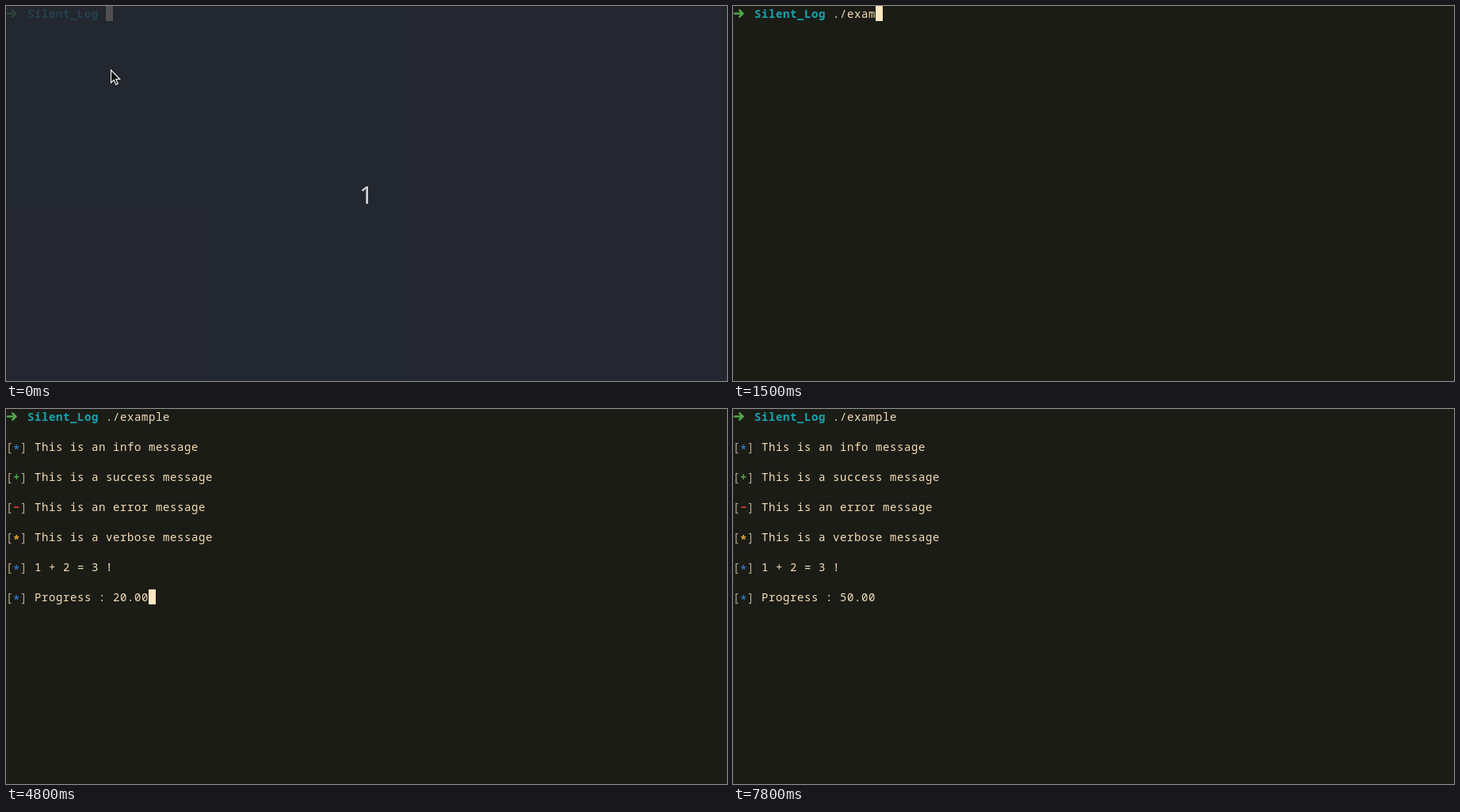
An HTML page that plays this animation: 910x474 px, repeating every 8 s.

```html
<!DOCTYPE html>
<html lang="en">
<head>
<meta charset="utf-8">
<style>
html, body { margin: 0; width: 100%; height: 100%; overflow: hidden; background: #1b1c16; }
#stage { position: relative; width: 910px; height: 474px; overflow: hidden; }
#stage > * { position: absolute; left: 0; top: 0; }
pre { margin: 0; color: #f7dfb9; font: 14px/19px "Noto Sans Mono", monospace; letter-spacing: .6px; }
pre div { position: absolute; left: 0; white-space: pre; }
i { font-style: normal; color: #b9ab90; }
.sign { font-weight: bold; }
.star { position: relative; top: 3px; }
.dir { left: 27px; color: #18a5ae; font-weight: bold; }
#typed { left: 126px; }
#block { width: 9px; height: 19px; background: #ffe7c0; }
#count { width: 910px; height: 474px; background: rgba(38, 42, 54, .8); }
#count span { position: absolute; left: 446px; top: 216px; color: #d3d5d9; font: 31px/44px "Noto Sans", sans-serif; }
</style>
</head>
<body>
<div id="stage">
  <svg width="20" height="19" fill="none" stroke="#50a648" stroke-width="2.6" stroke-linejoin="round" stroke-linecap="round">
    <path d="M2 9.5H12M8.3 5.5L12.4 9.5L8.3 13.5"/>
  </svg>
  <pre><div class="dir">Silent_Log</div><div id="typed"></div></pre>
  <pre id="output"></pre>
  <div id="block"></div>
  <div id="count"><span>1</span></div>
  <svg id="mouse" width="16" height="24">
    <path d="M.5 .8V17L4.2 13.5L6.7 19.3L9.3 18.2L6.8 12.5H11.7Z" fill="#111" stroke="#fff" stroke-width="1.1"/>
  </svg>
</div>
<script>
const $ = id => document.getElementById(id);
const LOOP = 8000, CELL = 9, ROW = 19, ENTER = 2400;
const command = "./example";

// Latest value whose start time has passed
const at = (t, steps) => steps.reduce((v, [start, next]) => t >= start ? next : v, 0);

const typing = [[400, 1], [700, 2], [1000, 3], [1200, 4], [1400, 5], [1500, 6], [1800, 7], [2100, 9]];
const progress = [[3500, 10], [4400, 20], [5400, 30], [6400, 40], [7400, 50]];
const blink = [[0, 1], [300, 0], [400, 1], [3400, 0], [4000, 1], [4200, 0],
               [4800, 1], [5400, 0], [6100, 1], [6600, 0], [7200, 1], [7800, 0]];

const lines = [
  ["*", "#2d74bd", "This is an info message"],
  ["+", "#50a648", "This is a success message"],
  ["−", "#d93a35", "This is an error message"],
  ["*", "#efaa35", "This is a verbose message"],
  ["*", "#2d74bd", "1 + 2 = 3 !"],
  ["*", "#2d74bd", 'Progress : <span id="value"></span>']
];
$("output").innerHTML = lines.map(([sign, color, text], k) =>
  `<div style="top:${(k + 1) * 2 * ROW}px"><i>[</i><span class="sign ${sign === "*" ? "star" : ""}" style="color:${color}">${sign}</span><i>]</i> ${text}</div>`
).join("");

const place = (el, x, y) => el.style.transform = `translate(${x}px,${y}px)`;
const show = (el, on) => el.style.visibility = on ? "visible" : "hidden";

function draw(t) {
  const chars = at(t, typing), ran = t >= ENTER;
  const value = at(t, progress).toFixed(2);
  $("typed").textContent = command.slice(0, chars);
  $("value").textContent = value;
  show($("output"), ran);
  show($("count"), t < 300);

  show($("block"), at(t, blink));
  place($("block"), (ran ? 15 + value.length : 14 + chars) * CELL, ran ? 12 * ROW : 0);

  // The pointer passes through the window in 100 ms steps
  const passing = t >= 6100 && t < 6600;
  const p = passing ? Math.floor((t - 6100) / 100) / 4 : 0;
  show($("mouse"), t < 400 || passing);
  place($("mouse"), passing ? Math.round(125 - 33 * p) : 132, passing ? Math.round(63 - 48 * p) : 80);
}

const begin = performance.now();
function frame() {
  draw((performance.now() - begin) % LOOP);
  requestAnimationFrame(frame);
}
frame();
</script>
</body>
</html>
```
